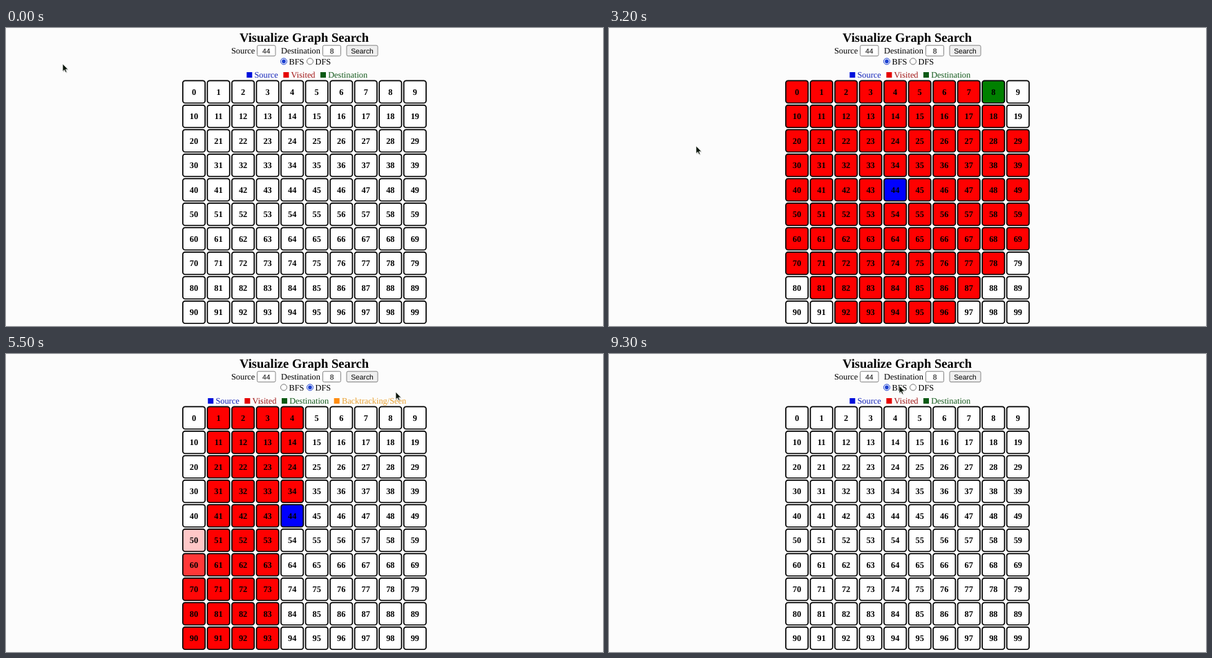
Write an HTML page that moves like this. It is 864x432 px and loops after 9.4 s.

```html
<!DOCTYPE html>
<html lang="en">
<head>
<meta charset="utf-8">
<title>Visualize Graph Search</title>
<style>
  html, body { margin: 0; width: 100%; height: 100%; overflow: hidden; background: #fcfcfc; }
  svg { display: block; width: 864px; height: 432px; }
  text { font: 12.36px "Liberation Serif", "Times New Roman", serif; text-rendering: geometricPrecision; }
  .title { font-size: 18.5px; font-weight: bold; }
  .num { font-weight: bold; text-anchor: middle; }
  .ui { font: 10.3px "Liberation Sans", Arial, sans-serif; text-anchor: middle; }
</style>
</head>
<body>
<svg id="stage" viewBox="0 0 864 432"></svg>
<script>
const LOOP = 9400, FADE = 105;
const SIZE = 10, START = 44, GOAL = 8;
const BFS_AT = 1448, LAYER = 167;
const DFS_AT = 4202, STEP = 32.86;
const TO_DFS = 3925, TO_BFS = 9200;
const WHITE = [255, 255, 255], RED = [255, 0, 0], BLUE = [0, 0, 255],
      GREEN = [0, 128, 0], ORANGE = [255, 165, 0];

const stage = document.getElementById("stage");

function add(tag, attrs, parent = stage, content = "") {
  const el = document.createElementNS("http://www.w3.org/2000/svg", tag);
  for (const key in attrs) el.setAttribute(key, attrs[key]);
  el.textContent = content;
  parent.append(el);
  return el;
}
const label = (x, y, str, cls = "", fill = "#000", parent = stage) =>
  add("text", { x, y, class: cls, fill }, parent, str);

// Page controls
label(338, 20.3, "Visualize Graph Search", "title");
label(326, 37, "Source");
label(398, 37, "Destination");
function box(x, w, str, fill, stroke) {
  add("rect", { x, y: 25.2, width: w, height: 15.4, rx: 2, fill, stroke, "stroke-width": 1 });
  label(x + w / 2, 36.6, str, "ui");
}
box(363.5, 26.5, "44", "#fff", "#858585");
box(458.5, 26, "8", "#fff", "#858585");
box(493, 45, "Search", "#efefef", "#858585");

function radio(cx, name) {
  const ring = add("circle", { cx, cy: 48.4, r: 4.5, fill: "#fff", "stroke-width": 1 });
  const dot = add("circle", { cx, cy: 48.4, r: 2.8, fill: "#1a3fd0" });
  label(cx + 7.5, 53.3, name);
  return on => {
    ring.setAttribute("stroke", on ? "#1a3fd0" : "#767676");
    dot.setAttribute("visibility", on ? "visible" : "hidden");
  };
}
const setBfs = radio(402, "BFS"), setDfs = radio(440, "DFS");

// Legends
const KEYS = [
  ["Source", "#0010dc", "#1020b8"],
  ["Visited", "#e60000", "#a01414"],
  ["Destination", "#0a5a14", "#145a1c"],
  ["Backtracking/Seen", "#ff8c10", "#e8a030"]
];
function legend(xs) {
  const g = add("g", {});
  xs.forEach((x, i) => {
    const [name, fill, ink] = KEYS[i];
    add("rect", { x, y: 64, width: 8, height: 8, fill }, g);
    label(x + 11.2, 72.4, name, "", ink, g);
  });
  return g;
}
const bfsLegend = legend([348.3, 401.4, 455]);
const dfsLegend = legend([292.2, 345.3, 399, 474.7]);

// Grid
const cells = Array.from({ length: SIZE * SIZE }, (_, n) => {
  const x = 255 + (n % SIZE) * 35.54, y = 75.6 + Math.floor(n / SIZE) * 35.5;
  const rect = add("rect", {
    x: x + 0.85, y: y + 0.85, width: 32.3, height: 32.3, rx: 3.4,
    stroke: "#000", "stroke-width": 1.7
  });
  label(x + 17, y + 21.2, n, "num");
  return { rect, events: [] };
});
const paint = (n, at, color) => cells[n].events.push({ at, color });

// Neighbours in the order up, down, left, right
function around(n) {
  const x = n % SIZE, list = [];
  if (n >= SIZE) list.push(n - SIZE);
  if (n < SIZE * (SIZE - 1)) list.push(n + SIZE);
  if (x > 0) list.push(n - 1);
  if (x < SIZE - 1) list.push(n + 1);
  return list;
}

function planBfs() {
  const depth = new Map([[START, 0]]), queue = [START];
  paint(START, BFS_AT, BLUE);
  for (const n of queue) {
    for (const m of around(n)) {
      if (depth.has(m)) continue;
      depth.set(m, depth.get(n) + 1);
      queue.push(m);
      paint(m, BFS_AT + depth.get(m) * LAYER, m === GOAL ? GREEN : RED);
      if (m === GOAL) return;
    }
  }
}

function planDfs() {
  const seen = new Set();
  let tick = 0;
  const mark = (n, color) => paint(n, DFS_AT + tick * STEP, color);
  function walk(n) {
    seen.add(n);
    mark(n, n === START ? BLUE : n === GOAL ? GREEN : RED);
    if (n === GOAL) return true;
    let leaf = true;
    for (const m of around(n)) {
      if (seen.has(m)) continue;
      if (leaf) tick++;
      leaf = false;
      if (walk(m)) return true;
    }
    tick += leaf ? 2 : 1;
    mark(n, ORANGE);
    return false;
  }
  walk(START);
}

const clear = at => cells.forEach((_, n) => paint(n, at, WHITE));
planBfs();
clear(TO_DFS);
planDfs();
clear(TO_BFS);

// CSS "ease": cubic-bezier(.25, .1, .25, 1)
function ease(p) {
  if (p <= 0) return 0;
  if (p >= 1) return 1;
  const curve = (a, b, u) => 3 * a * u * (1 - u) ** 2 + 3 * b * u * u * (1 - u) + u ** 3;
  let lo = 0, hi = 1;
  for (let i = 0; i < 16; i++) {
    const mid = (lo + hi) / 2;
    if (curve(0.25, 0.25, mid) < p) lo = mid; else hi = mid;
  }
  return curve(0.1, 1, lo);
}

function colorAt(events, t) {
  let c = WHITE;
  for (const { at, color } of events) {
    if (t <= at) break;
    const k = ease((t - at) / FADE);
    c = c.map((v, i) => v + (color[i] - v) * k);
  }
  return `rgb(${c.map(Math.round)})`;
}

// Pointer: time, x, y
const TRAIL = [
  [0, 82, 52], [600, 82, 52], [1000, 480, 58], [1250, 516, 30], [1440, 516, 30],
  [1950, 126, 171], [3300, 126, 171], [3850, 437, 50], [4010, 437, 50],
  [4140, 516, 30], [4210, 516, 30], [4500, 564, 55], [8400, 564, 55],
  [8700, 670, 62], [8850, 670, 62], [9150, 403, 46], [9210, 403, 46],
  [9300, 420, 46], [LOOP, 420, 46]
];
const pointer = add("g", {});
const ARROW = "M0 0V11L2.5 8.7L4.2 12.3L6 11.5L4.4 8H7.8Z";
add("path", { d: ARROW, transform: "translate(.8 1.2)", fill: "#000", opacity: 0.2 }, pointer);
add("path", { d: ARROW, fill: "#0c160c", stroke: "#fff", "stroke-width": 0.7 }, pointer);

function pointerAt(t) {
  const i = TRAIL.findIndex(p => p[0] > t);
  const [t0, x0, y0] = TRAIL[i - 1], [t1, x1, y1] = TRAIL[i];
  const p = (t - t0) / (t1 - t0), k = p * p * (3 - 2 * p);
  return [x0 + (x1 - x0) * k, y0 + (y1 - y0) * k];
}

function draw(now) {
  const t = Math.max(0, now) % LOOP;
  const dfs = t >= TO_DFS && t < TO_BFS;
  setBfs(!dfs);
  setDfs(dfs);
  bfsLegend.setAttribute("visibility", dfs ? "hidden" : "visible");
  dfsLegend.setAttribute("visibility", dfs ? "visible" : "hidden");
  for (const { rect, events } of cells) rect.setAttribute("fill", colorAt(events, t));
  pointer.setAttribute("transform", `translate(${pointerAt(t)})`);
}

const began = performance.now();
function frame() {
  draw(performance.now() - began);
  requestAnimationFrame(frame);
}
frame();
</script>
</body>
</html>
```
